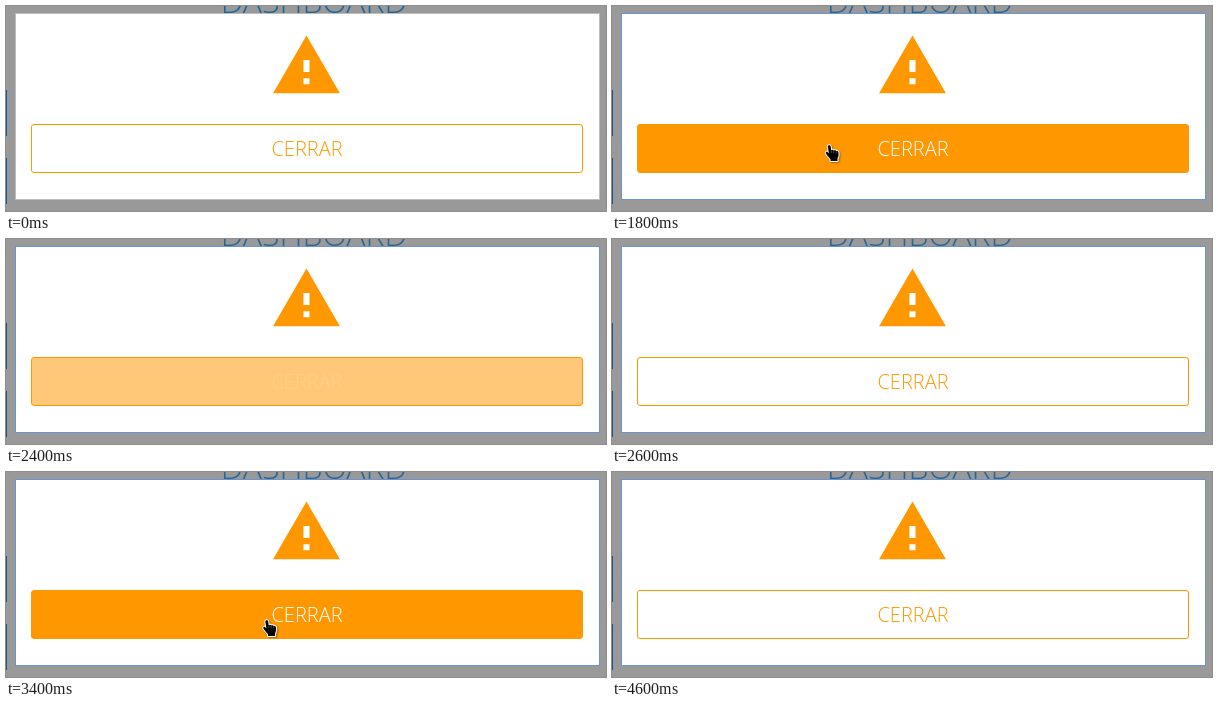
Animation of 600 by 205 pixels, one loop 5.2 s. Source, as an HTML page with a canvas:

```html
<!DOCTYPE html>
<html lang="es">
<head>
<meta charset="utf-8">
<title>Cerrar</title>
<style>
html, body { margin: 0; width: 100%; height: 100%; overflow: hidden; background: #999; }
canvas { display: block; width: 600px; height: 205px; }
</style>
</head>
<body>
<canvas id="stage" width="600" height="205"></canvas>
<script>
const ctx = document.getElementById('stage').getContext('2d');
const LOOP = 5200;
const ORANGE = [255, 152, 0];
const WHITE = [255, 255, 255];

// start time, hover amount, cursor shape and position
const STEPS = [
  { at: 0, hover: 0 },
  { at: 1600, hover: 0.155, cursor: 'hand', x: 195, y: 153 },
  { at: 1800, hover: 1, cursor: 'hand', x: 212.5, y: 138 },
  { at: 2200, hover: 1 },
  { at: 2400, hover: 0.53 },
  { at: 2600, hover: 0 },
  { at: 3200, hover: 0.5, cursor: 'hand', x: 256, y: 147 },
  { at: 3400, hover: 1, cursor: 'hand', x: 256, y: 147 },
  { at: 4200, hover: 1, cursor: 'arrow', x: 257, y: 183.5 },
  { at: 4400, hover: 0 }
];

const TRIANGLE = new Path2D('M1 21h22L12 2 1 21zm12-3h-2v-2h2v2zm0-4h-2v-4h2v4z');
const ARROW = new Path2D('M.5.5V15.5L3.9 12.4 6.4 18.2 9 17.1 6.5 11.4H11z');
const HAND = new Path2D('M3.3 2.6C3.3.7 6 .7 6.2 2.6L6.7 6.2C7.4 5.3 9 5.5 9.2 6.6 10 5.8 11.5 6.1 11.7 7.2 12.7 6.6 14 7.3 14 8.7V11.5C14 13 13 13.8 13 15V17H6V15.2C4.6 13.6 2.6 11.4 1.4 9.4.8 8.1 2.2 7.3 3.2 8.2L4.4 9.4z');
const CREASES = new Path2D('M6.8 6.5V9M9.2 7V9.2M11.7 7.5V9.5');

const rgb = c => `rgb(${c.map(Math.round)})`;
const mix = (a, b, k) => rgb(a.map((v, i) => v + (b[i] - v) * k));

function text(label, size, x, y, color) {
  ctx.font = `300 ${size}px "Open Sans", sans-serif`;
  ctx.textAlign = 'center';
  ctx.fillStyle = color;
  ctx.fillText(label, x, y);
}

function drawPage(focused) {
  ctx.fillStyle = '#999';
  ctx.fillRect(0, 0, 600, 205);
  text('DASHBOARD', 32, 308, 7, focused ? '#2c6590' : '#1b649c');
  ctx.fillStyle = focused ? '#1c567e' : '#0b5a98';
  ctx.fillRect(0, 84, 1, 46);
  ctx.fillRect(0, 152, 1, 46);
}

function drawDialog(focused) {
  ctx.fillStyle = '#fff';
  ctx.fillRect(9, 7, 585, 187);
  ctx.lineWidth = 1;
  ctx.strokeStyle = focused ? '#6a94d4' : '#bcbcbc';
  ctx.strokeRect(9.5, 7.5, 584, 186);

  ctx.save();
  ctx.translate(264, 23.5);
  ctx.scale(3.04, 3.04);
  ctx.fillStyle = rgb(ORANGE);
  ctx.fill(TRIANGLE);
  ctx.restore();
}

function drawButton(hover) {
  ctx.beginPath();
  ctx.roundRect(25.5, 118.5, 551, 48, 2.5);
  ctx.fillStyle = mix(WHITE, ORANGE, hover);
  ctx.fill();
  ctx.strokeStyle = rgb(ORANGE);
  ctx.stroke();
  text('CERRAR', 20, 301, 150, mix(ORANGE, WHITE, hover));
}

function drawCursor({ cursor, x, y }) {
  const shape = cursor === 'hand' ? HAND : ARROW;
  ctx.save();
  ctx.translate(x, y);
  ctx.lineJoin = 'round';
  ctx.shadowColor = 'rgba(0,0,0,.35)';
  ctx.shadowBlur = 2;
  ctx.shadowOffsetX = ctx.shadowOffsetY = 1;
  ctx.strokeStyle = '#fff';
  ctx.lineWidth = 2;
  ctx.stroke(shape);
  ctx.shadowColor = 'transparent';
  ctx.fillStyle = '#000';
  ctx.fill(shape);
  if (cursor === 'hand') {
    ctx.strokeStyle = 'rgba(255,255,255,.5)';
    ctx.lineWidth = 0.6;
    ctx.stroke(CREASES);
  }
  ctx.restore();
}

function draw(now) {
  const t = now % LOOP;
  const step = STEPS.findLast(s => s.at <= t);
  const focused = t >= 1600;
  drawPage(focused);
  drawDialog(focused);
  drawButton(step.hover);
  if (step.cursor) drawCursor(step);
}

const start = performance.now();
function tick() {
  draw(performance.now() - start);
  requestAnimationFrame(tick);
}
tick();
</script>
</body>
</html>
```
